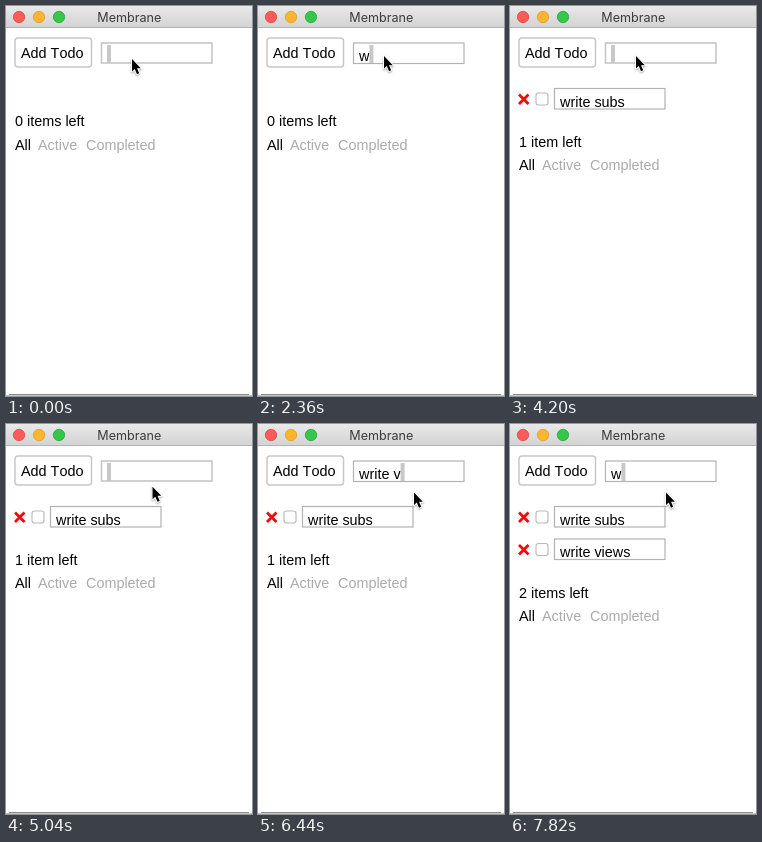
Recreate the animation shown at these times as an HTML page with a canvas. Size 246 px wide and 390 px high, loop 8000 ms.

```html
<!DOCTYPE html>
<html lang="en">
<head>
<meta charset="utf-8">
<title>Membrane</title>
<style>
  html, body { margin: 0; width: 100%; height: 100%; overflow: hidden; background: #fff; }
  canvas { display: block; width: 246px; height: 390px; }
</style>
</head>
<body>
<canvas id="stage"></canvas>
<script>
const W = 246, H = 390, LOOP = 8000;
const FONT = '14.4px "Liberation Sans", Arial, sans-serif';
const ROW_STEP = 32.5;
const SUBMITS = [[4200, 'write subs'], [7300, 'write views']];

// Each key press: time, then the character ('<' deletes, '\n' submits).
const KEYS = [
  [1560, 'w'], [1840, 'i'], [2360, '<'], [2400, 'r'],
  [2640, 'i'], [2740, 't'], [2840, 'e'], [2920, ' '],
  [3100, 's'], [3220, 'u'], [3340, 'b'], [3660, 's'], [4200, '\n'],
  [5580, 'w'], [5720, 'r'], [5880, 'i'], [6020, 't'], [6040, 'e'], [6180, ' '],
  [6440, 'v'], [6560, 'i'], [6700, 'e'], [6740, 'w'], [7000, 's'], [7300, '\n'],
  [7820, 'w']
];

const canvas = document.getElementById('stage');
const ctx = canvas.getContext('2d');
const dpr = window.devicePixelRatio || 1;
canvas.width = W * dpr;
canvas.height = H * dpr;

function label(text, x, y, color = '#000') {
  ctx.font = FONT;
  ctx.fontKerning = 'none';
  ctx.fillStyle = color;
  ctx.fillText(text, x, y);
}

function rounded(x, y, w, h, r, color, width) {
  ctx.beginPath();
  ctx.roundRect(x, y, w, h, r);
  ctx.strokeStyle = color;
  ctx.lineWidth = width;
  ctx.stroke();
}

function dot(x, y, r, fill, edge) {
  ctx.beginPath();
  ctx.arc(x, y, r, 0, Math.PI * 2);
  ctx.fillStyle = fill;
  ctx.fill();
  ctx.strokeStyle = edge;
  ctx.lineWidth = 0.8;
  ctx.stroke();
}

function drawWindow() {
  ctx.fillStyle = '#fff';
  ctx.fillRect(0, 0, W, H);

  const bar = ctx.createLinearGradient(0, 0, 0, 22);
  bar.addColorStop(0, '#e9e9e9');
  bar.addColorStop(1, '#d2d2d2');
  ctx.fillStyle = bar;
  ctx.fillRect(0, 0, W, 21);
  ctx.fillStyle = '#b4b4b4';
  ctx.fillRect(0, 21, W, 1);

  dot(13, 11, 5.7, '#fc5b57', '#df4744');
  dot(33, 11, 5.7, '#fdb530', '#de9d28');
  dot(53, 11, 5.7, '#34c749', '#27a935');

  ctx.font = '12.6px Inter, Roboto, sans-serif';
  ctx.fontKerning = 'auto';
  ctx.fillStyle = '#3c3c3c';
  ctx.textAlign = 'center';
  ctx.fillText('Membrane', 123.3, 16);
  ctx.textAlign = 'left';

  ctx.fillStyle = '#8c8c8c';
  ctx.fillRect(3, 388, W - 6, 1);
  ctx.fillStyle = '#c4c4c4';
  ctx.fillRect(0, 389, W, 1);
}

function typedText(t) {
  let s = '';
  for (const [at, key] of KEYS) {
    if (t < at) break;
    s = key === '\n' ? '' : key === '<' ? s.slice(0, -1) : s + key;
  }
  return s;
}

function drawField(x, y, text) {
  const h = text ? 20.5 : 20;
  ctx.strokeStyle = text ? '#b2b2b2' : '#c6c6c6';
  ctx.lineWidth = text ? 1.2 : 1.6;
  ctx.strokeRect(x, y, 110.5, h);
  label(text, x + 5.5, y + 18);
}

function drawInput(text) {
  drawField(95.5, 37, text);
  ctx.font = FONT;
  ctx.fillStyle = '#c8c8c8';
  ctx.fillRect(101 + ctx.measureText(text).width, 39, 4, 18);
}

function drawTodo(text, y) {
  ctx.strokeStyle = '#f00a0a';
  ctx.lineWidth = 2.8;
  ctx.beginPath();
  ctx.moveTo(9, y + 6);
  ctx.lineTo(18.5, y + 15.5);
  ctx.moveTo(18.5, y + 6);
  ctx.lineTo(9, y + 15.5);
  ctx.stroke();
  rounded(26, y + 4.5, 12, 12, 2.5, '#bcbcbc', 1.2);
  drawField(44.5, y, text);
}

function drawFooter(count) {
  const y = count ? 164 + (count - 1) * 33 : 144;
  label(`${count} item${count === 1 ? '' : 's'} left`, 9, y - (count ? 23 : 24));
  label('All', 9, y);
  label('Active', 32, y, '#ababab');
  label('Completed', 80, y, '#ababab');
}

function pointerAt(t) {
  if (t < 20) return [126, 53];
  if (t < 420) return [126, 52];
  if (t < 4780) return [126, 50];
  const p = Math.min(8, Math.floor((t - 4780) / 54.2) + 1) / 8;
  const e = p * p * (3 - 2 * p);
  return [126 + 30 * e, 50 + 18.5 * e];
}

function drawClick(t, x, y) {
  if (t < 420 || t >= 720) return;
  const step = Math.min(4, Math.floor((t - 420) / 46.6) + 1);
  ctx.beginPath();
  ctx.arc(x - 0.5, y, 21, 0, Math.PI * 2);
  ctx.strokeStyle = `rgba(0,0,0,${step * 0.16})`;
  ctx.lineWidth = 2;
  ctx.stroke();
}

function drawPointer(x, y) {
  ctx.save();
  ctx.translate(x, y);
  ctx.beginPath();
  ctx.moveTo(0, 0);
  ctx.lineTo(0, 12.6);
  ctx.lineTo(2.8, 10);
  ctx.lineTo(5, 15.2);
  ctx.lineTo(7.2, 14.2);
  ctx.lineTo(5, 9.2);
  ctx.lineTo(8.8, 9.2);
  ctx.closePath();
  ctx.shadowColor = 'rgba(0,0,0,0.35)';
  ctx.shadowBlur = 2 * dpr;
  ctx.shadowOffsetY = dpr;
  ctx.strokeStyle = '#fff';
  ctx.lineWidth = 2;
  ctx.lineJoin = 'round';
  ctx.stroke();
  ctx.shadowColor = 'transparent';
  ctx.fillStyle = '#000';
  ctx.fill();
  ctx.restore();
}

function draw(t) {
  ctx.setTransform(dpr, 0, 0, dpr, 0, 0);
  drawWindow();
  rounded(9, 32, 76.5, 29, 3, '#c8c8c8', 1.5);
  label('Add Todo', 15, 52);
  drawInput(typedText(t));

  const todos = SUBMITS.filter(([at]) => t >= at);
  todos.forEach(([, text], i) => drawTodo(text, 82.5 + i * ROW_STEP));
  drawFooter(todos.length);

  const [x, y] = pointerAt(t);
  drawClick(t, x, y);
  drawPointer(x, y);
}

const start = performance.now();
function tick() {
  draw((performance.now() - start) % LOOP);
  requestAnimationFrame(tick);
}
tick();
</script>
</body>
</html>
```
